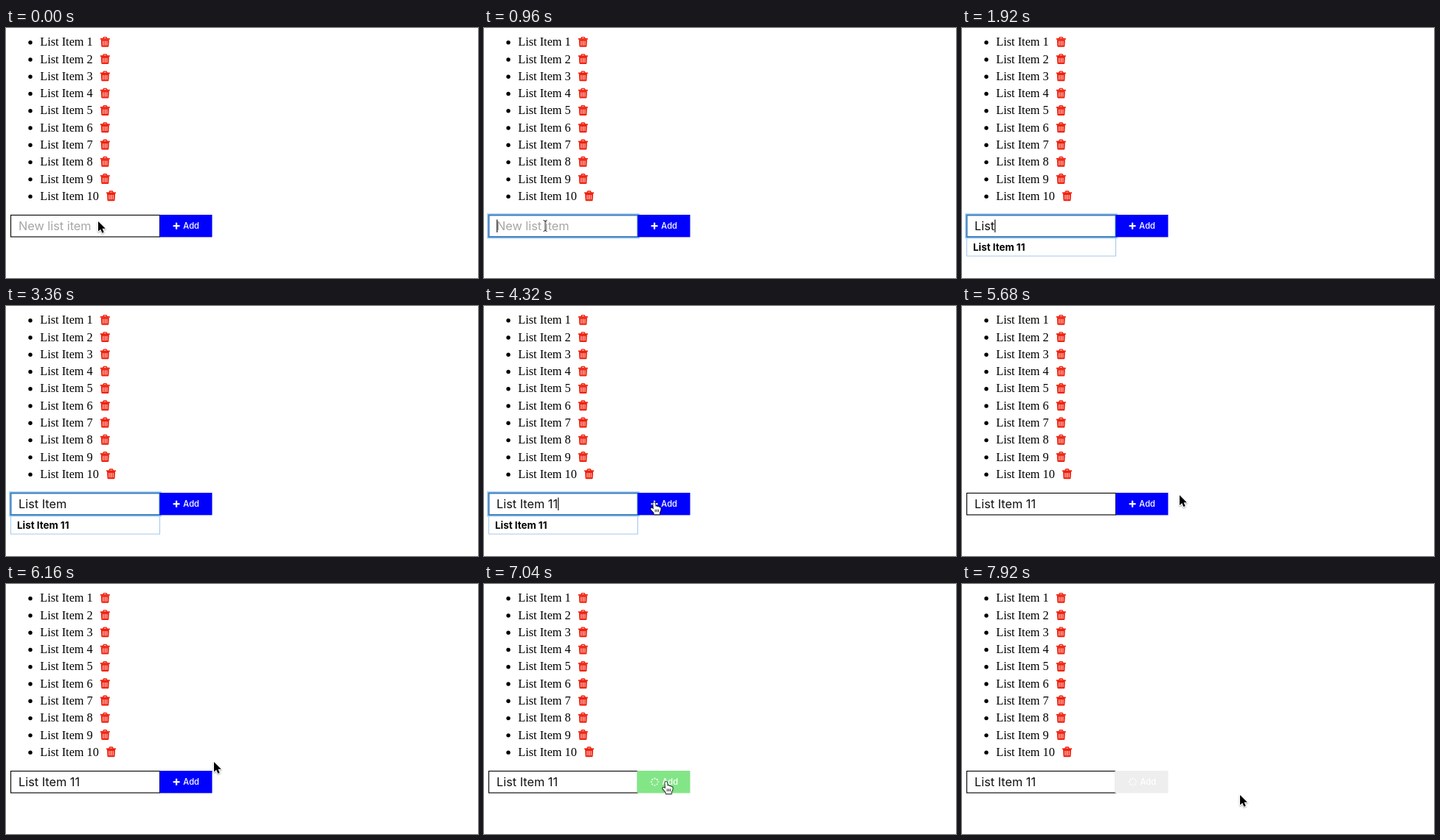
Recreate the animation shown at these times as an HTML page with a canvas. Size 640 by 340 pixels, loop 8000 ms.

```html
<!DOCTYPE html>
<html lang="en">
<head>
<meta charset="utf-8">
<title>Add a list item</title>
<style>
  html, body { margin: 0; width: 100%; height: 100%; overflow: hidden; background: #fff; }
  canvas { display: block; width: 640px; height: 340px; }
</style>
</head>
<body>
<canvas id="stage"></canvas>
<script>
const LOOP = 8000;
const canvas = document.getElementById('stage');
const ctx = canvas.getContext('2d');
const ratio = window.devicePixelRatio || 1;
canvas.width = 640 * ratio;
canvas.height = 340 * ratio;

const SANS = 'Inter, Roboto, sans-serif';
const SERIF = '"Liberation Serif", "Times New Roman", serif';
const ENTRY = 'List Item 11';
const FOCUS = 760, BLUR = 4560, CLICK = 6640;
const KEYS = [1440, 1560, 1700, 1840, 2080, 2240, 2400, 2520, 2660, 2800, 3700, 3880];

// Pointer path: time, x, y of the hot spot.
const PATH = [
  [0, 125, 263], [80, 125, 263], [480, 83, 269], [4100, 83, 269],
  [4480, 321, 266], [4640, 321, 266], [4900, 251, 263], [5120, 251, 263],
  [5440, 290, 260], [5600, 290, 260], [5840, 309, 250], [6160, 282, 242],
  [6420, 249, 266], [6600, 247, 269], [7360, 247, 269], [7840, 377, 287], [LOOP, 377, 287]
];

const ARROW = new Path2D('M0 0V13.6L3.2 10.7 5.4 15.7 7.7 14.7 5.6 9.8H9.8Z');
const HAND = new Path2D('M-1.6 1.2Q-1.3-.2 0 0 1.3.2 1.4 1.6L1.8 5.4Q3.6 4.5 4.3 6 6 5.2 6.7 6.8 8.7 6.2 8.8 8.4' +
  'Q8.9 11.5 7.2 13.6V16H-.3V14.2L-4.4 9.6Q-5.1 8.2-3.8 7.7-2.5 7.4-.9 9.4Z');
const BUTTON = { x: 208.5, y: 254, w: 71, h: 30.4 };

const clamp = v => Math.max(0, Math.min(1, v));
const ease = v => v * v * (3 - 2 * v);
const inside = (p, b) => p.x > b.x && p.x < b.x + b.w && p.y > b.y && p.y < b.y + b.h;

function pointerAt(t) {
  const i = Math.max(1, PATH.findIndex(p => p[0] > t));
  const [t0, x0, y0] = PATH[i - 1], [t1, x1, y1] = PATH[i];
  const k = ease((t - t0) / (t1 - t0));
  return { x: x0 + (x1 - x0) * k, y: y0 + (y1 - y0) * k };
}

function rect(x, y, w, h, color) {
  ctx.fillStyle = color;
  ctx.fillRect(x, y, w, h);
}

function frame(x, y, w, h, color, width) {
  ctx.strokeStyle = color;
  ctx.lineWidth = width;
  ctx.strokeRect(x, y, w, h);
}

function text(s, x, y, font, color) {
  ctx.font = font;
  ctx.fillStyle = color;
  ctx.fillText(s, x, y);
}

function trash(x, y) {
  const red = '#ef200d';
  ctx.strokeStyle = red;
  ctx.lineWidth = 1.4;
  ctx.beginPath();
  ctx.moveTo(x + 3.6, y + 2.8);
  ctx.lineTo(x + 4.8, y + .8);
  ctx.lineTo(x + 8.2, y + .8);
  ctx.lineTo(x + 9.4, y + 2.8);
  ctx.stroke();
  rect(x, y + 2.2, 13, 1.7, red);
  ctx.beginPath();
  ctx.moveTo(x + 1, y + 3.6);
  ctx.lineTo(x + 12, y + 3.6);
  ctx.lineTo(x + 11.5, y + 13);
  ctx.quadraticCurveTo(x + 11.4, y + 14, x + 10.3, y + 14);
  ctx.lineTo(x + 2.7, y + 14);
  ctx.quadraticCurveTo(x + 1.6, y + 14, x + 1.5, y + 13);
  ctx.fill();
  for (const dx of [3.5, 6.05, 8.6]) rect(x + dx, y + 5.7, .95, 6.3, '#fff');
}

function list() {
  for (let i = 0; i < 10; i++) {
    const y = 24.4 + i * 23.27;
    ctx.fillStyle = '#000';
    ctx.beginPath();
    ctx.arc(33, y - 4.7, 2.7, 0, 7);
    ctx.fill();
    text('List Item ' + (i + 1), 46.3, y, '16.3px ' + SERIF, '#000');
    trash(i < 9 ? 127.8 : 136, y - 12.6);
  }
}

function input(t) {
  const focused = t >= FOCUS && t < BLUR;
  const typed = KEYS.filter(k => k <= t).length;
  const value = ENTRY.slice(0, typed);
  const font = '16.3px ' + SANS;

  if (focused && typed) {
    frame(6.5, 284.5, 202, 25.6, '#a5c7e9', 1);
    text(ENTRY, 15, 303, '700 13.4px ' + SANS, '#000');
  }
  if (focused) {
    frame(6.5, 254.5, 202, 29.6, '#b3d7f8', 5);
    rect(6.5, 254.5, 202, 29.6, '#fff');
    frame(6.5, 254.5, 202, 29.6, '#3a7dbd', 2);
  } else {
    frame(6.5, 254.5, 202, 29.5, '#111', 1.2);
  }
  text(value || 'New list item', 17, 275.3, font, value ? '#111' : '#a6a6a6');

  const lastEvent = typed ? KEYS[typed - 1] : FOCUS;
  if (focused && (t - lastEvent) % 1060 < 530) {
    ctx.font = font;
    rect(17.2 + ctx.measureText(value).width, 260.5, 1.1, 17.5, '#000');
  }
}

// Fades the button colour as the pointer enters, clicks and leaves.
const FADES = [
  { at: 0, color: [0, 0, 255] },
  { at: 4780, color: [0, 72, 184] }, { at: 5300, color: [0, 0, 255] },
  { at: 6330, color: [0, 72, 184] }, { at: CLICK, color: [130, 230, 135] },
  { at: 7500, color: [238, 238, 238] }
];

function buttonColor(t) {
  const i = FADES.findLastIndex(f => f.at <= t);
  const from = FADES[Math.max(0, i - 1)].color;
  const k = clamp((t - FADES[i].at) / 200);
  return `rgb(${FADES[i].color.map((c, j) => Math.round(from[j] + (c - from[j]) * k))})`;
}

function button(t) {
  const { x, y, w, h } = BUTTON;
  const busy = t >= CLICK;
  rect(busy ? x - 1 : x, y, busy ? w + 1 : w, h, buttonColor(t));
  if (busy) {
    const turn = Math.floor(t / 125) * Math.PI / 4;
    for (let i = 0; i < 8; i++) {
      const a = turn + i * Math.PI / 4;
      ctx.fillStyle = `rgba(255,255,255,${.65 + i * .05})`;
      ctx.beginPath();
      ctx.arc(231.5 + 4.6 * Math.cos(a), 269.2 + 4.6 * Math.sin(a), 1.15, 0, 7);
      ctx.fill();
    }
  } else {
    rect(226.6, 268.1, 9, 2.2, '#fff');
    rect(230, 264.7, 2.2, 9, '#fff');
  }
  text('Add', busy ? 241.5 : 240.3, 273.2, '500 11.2px ' + SANS, '#fff');
}

function pointer(t, p) {
  if (t >= KEYS[0] && t < 4160) return;
  const overInput = inside(p, { x: 6, y: 254, w: 202, h: 30 });
  ctx.save();
  ctx.translate(p.x, p.y);
  ctx.lineJoin = 'round';
  if (overInput && t > 120) {
    ctx.strokeStyle = '#222';
    ctx.lineWidth = 1;
    ctx.stroke(new Path2D('M-2.5-7.5Q0-7.5 0-5.5 0-7.5 2.5-7.5M0-5.5V5.5M-2.5 7.5Q0 7.5 0 5.5 0 7.5 2.5 7.5'));
  } else {
    const hand = inside(p, BUTTON);
    const shape = hand ? HAND : ARROW;
    ctx.shadowColor = 'rgba(0,0,0,.35)';
    ctx.shadowBlur = 2 * ratio;
    ctx.shadowOffsetY = ratio;
    ctx.strokeStyle = hand ? '#111' : '#fff';
    ctx.lineWidth = hand ? 1.5 : 2;
    ctx.stroke(shape);
    ctx.shadowColor = 'transparent';
    ctx.fillStyle = hand ? '#fff' : '#000';
    ctx.fill(shape);
    if (hand) {
      ctx.lineWidth = .9;
      ctx.stroke(new Path2D('M1.4 9.5V13M3.5 9.5V13M5.6 9.5V13'));
    }
  }
  ctx.restore();
}

function draw(now) {
  const t = now % LOOP;
  ctx.setTransform(ratio, 0, 0, ratio, 0, 0);
  rect(0, 0, 640, 340, '#fff');
  list();
  input(t);
  button(t);
  pointer(t, pointerAt(t));
}

const start = performance.now();
function tick() {
  draw(performance.now() - start);
  requestAnimationFrame(tick);
}
tick();
</script>
</body>
</html>
```
